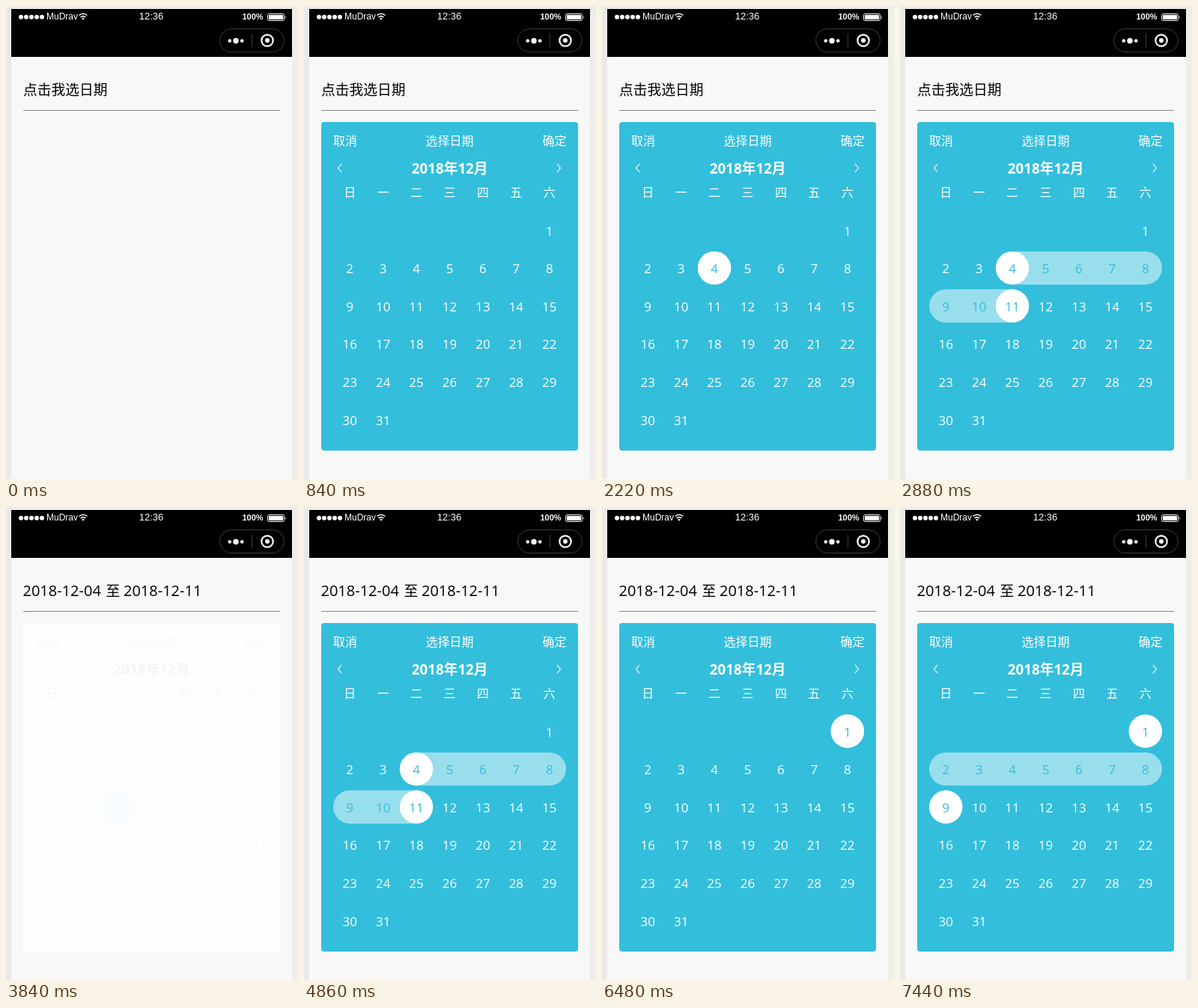
Recreate the animation shown at these times as an HTML page. Size 390 by 632 pixels, loop 8000 ms.

```html
<!DOCTYPE html>
<html lang="zh-CN">
<head>
<meta charset="utf-8">
<style>
  html, body { margin: 0; width: 100%; height: 100%; overflow: hidden; background: #ecece8; }
  svg { display: block; }
  text { font: 16px "Open Sans", "Noto Sans CJK SC", "Noto Sans CJK", sans-serif; }
  .status { font: 12px "Liberation Sans", sans-serif; fill: #fff; }
  .field { font-size: 18.75px; }
  .date { font-size: 20px; }
  .month { font-size: 18.75px; font-weight: 700; }
  .day { font-size: 17px; }
  .mid { text-anchor: middle; }
  .end { text-anchor: end; }
</style>
</head>
<body>
<svg width="390" height="632" viewBox="0 0 390 632">
  <path fill="#e9e9e7" d="M0 4h7v628H0z"/>
  <path fill="#eeeee9" d="M382 4h8v628h-8z"/>
  <path fill="#f8f8f8" d="M7 68h375v564H7z"/>
  <path d="M7 4h375v64H7z"/>
  <path d="M20 14.7h28.1" stroke="#fff" stroke-width="6" stroke-linecap="round" stroke-dasharray="0 7"/>
  <text class="status" x="54" y="18">MuDrav</text>
  <g fill="none" stroke="#fff" stroke-width="1.5">
    <path d="M97.5 12.5q5.5-4.6 11 0M99.6 15q3.4-2.8 6.8 0"/>
    <path fill="#fff" stroke="none" d="M101 16.6q2-1.4 4 0l-2 2.2z"/>
  </g>
  <text class="status mid" x="194" y="18" style="font-size:13px">12:36</text>
  <text class="status" x="315.5" y="18" style="font-size:11px;font-weight:700">100%</text>
  <rect x="349.5" y="10.5" width="22" height="9" rx="2" fill="none" stroke="#fff"/>
  <path fill="#fff" d="M351 12h19v6h-19zM373 13.2q2 1.8 0 3.6z"/>
  <rect x="285.5" y="30.5" width="86" height="31" rx="15.5" fill="none" stroke="#3b3b3b"/>
  <path d="M328.5 37v18" stroke="#3b3b3b"/>
  <g fill="#fff">
    <circle cx="298.8" cy="46.5" r="2.3"/>
    <circle cx="307" cy="46.5" r="3.7"/>
    <circle cx="315.2" cy="46.5" r="2.3"/>
    <circle cx="349" cy="46" r="3"/>
  </g>
  <circle cx="349" cy="46" r="7.7" fill="none" stroke="#fff" stroke-width="2.2"/>
  <path d="M23 139.5h343" stroke="#868686"/>
  <g id="field"></g>
  <g id="panel"></g>
</svg>
<script>
const LOOP = 8000, BLUE = '#33bedc', CELL = 311 / 7, R = 22.2;
const field = document.getElementById('field');
const panel = document.getElementById('panel');

const steps = [
  { at: 0 },
  { at: 840, open: true },
  { at: 2220, open: true, from: 4, to: 4 },
  { at: 2880, open: true, from: 4, to: 11 },
  { at: 3840, open: true, from: 4, to: 11, picked: true, fading: true },
  { at: 4860, open: true, from: 4, to: 11, picked: true },
  { at: 6480, open: true, from: 1, to: 1, picked: true },
  { at: 7440, open: true, from: 1, to: 9, picked: true }
];

const label = (str, x, y, cls, fill = '#000') =>
  `<text x="${x}" y="${y}" class="${cls}" fill="${fill}">${str}</text>`;
const colX = col => 39 + CELL * (col + 0.5);
const rowY = row => 299.5 + 50.6 * row;
const place = day => [(day + 5) % 7, Math.floor((day + 5) / 7)];

function disc(day, fill) {
  const [col, row] = place(day);
  return `<circle cx="${colX(col)}" cy="${rowY(row)}" r="${R}" fill="${fill}"/>`;
}

// One rounded bar for each week the range crosses
function bars(from, to) {
  let out = '';
  const [firstCol, firstRow] = place(from), [lastCol, lastRow] = place(to);
  for (let row = firstRow; row <= lastRow; row++) {
    const a = row === firstRow ? firstCol : 0;
    const b = row === lastRow ? lastCol : 6;
    out += `<rect x="${39 + a * CELL}" y="${rowY(row) - R}" width="${(b - a + 1) * CELL}"
      height="${2 * R}" rx="${R}" fill="#fff" fill-opacity=".5"/>`;
  }
  return out;
}

function calendar({ from, to, fading }) {
  const ink = fading ? '#f8f8f8' : '#fff';
  const chevrons = fading ? '' :
    `<path d="M50 211l-4.5 5.5 4.5 5.5M338 211l4.5 5.5-4.5 5.5" fill="none"
      stroke="#fff" stroke-opacity=".75" stroke-width="1.4"/>`;
  let out = `<rect x="23" y="155" width="343" height="439" rx="4" fill="${fading ? '#fefefe' : BLUE}"/>`
    + label('取消', 39, 185.5, '', ink)
    + label('选择日期', 194.5, 185.5, 'mid', ink)
    + label('确定', 350.5, 185.5, 'end', ink)
    + label('2018年12月', 194.7, 223.5, 'month mid', fading ? '#f5f5f5' : '#fff')
    + chevrons;
  [...'日一二三四五六'].forEach((name, col) => out += label(name, colX(col), 254.5, 'mid', ink));
  if (fading) out += disc(to, '#f7fcfe');
  else if (from) out += (to > from ? bars(from, to) : '') + disc(from, '#fff') + disc(to, '#fff');
  for (let day = 1; day <= 31; day++) {
    const [col, row] = place(day), chosen = day >= from && day <= to;
    const fill = chosen ? (fading ? '#fefefe' : BLUE) : (fading ? '#fafafa' : '#fff');
    out += label(day, colX(col), rowY(row) + 7, 'day mid', fill);
  }
  return out;
}

function show(step) {
  field.innerHTML = step.picked
    ? label('2018-12-04', 22.5, 119, 'date') + label('至', 133.5, 119, 'field') + label('2018-12-11', 157, 119, 'date')
    : label('点击我选日期', 23, 119, 'field');
  panel.innerHTML = step.open ? calendar(step) : '';
}

let current;
function tick() {
  const t = performance.now() % LOOP;
  const step = steps.filter(s => s.at <= t).pop();
  if (step !== current) show(current = step);
  requestAnimationFrame(tick);
}
tick();
</script>
</body>
</html>
```
